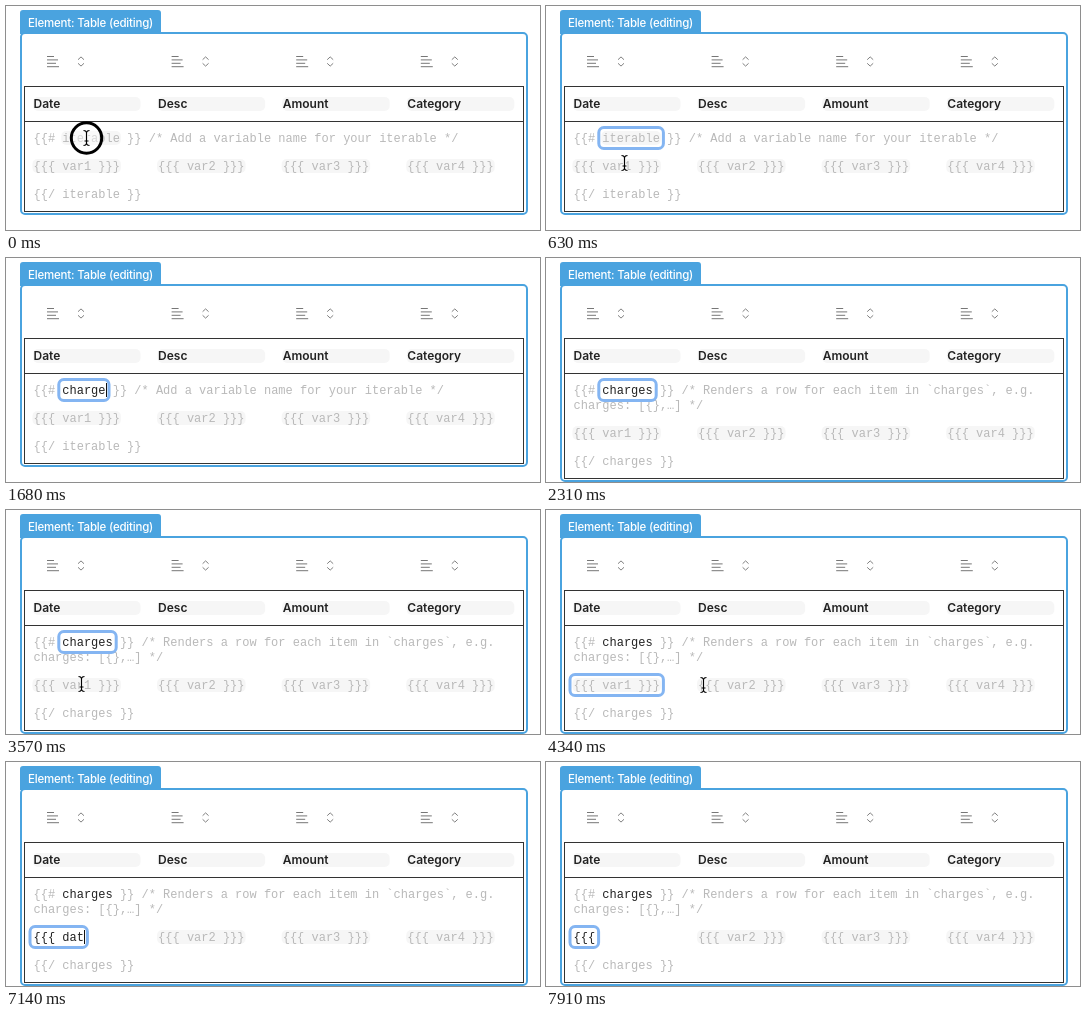
These frames come from a looping animation (534x224 px, 8 s). An HTML page with a canvas:

```html
<!DOCTYPE html>
<html lang="en">
<head>
<meta charset="utf-8">
<title>Table editing</title>
<style>
  html, body { margin: 0; width: 100%; height: 100%; overflow: hidden; background: #fff; }
  canvas { display: block; width: 534px; height: 224px; }
</style>
</head>
<body>
<canvas id="stage"></canvas>
<script>
const W = 534, H = 224, LOOP = 8000, STEP = 70;
const MONO = '12px "Liberation Mono", monospace';
const SANS = 'Inter, sans-serif';
const CHAR = 7.2, LEFT = 27.5, COL = 124.6;
const BLUE = '#4aa3df', RING = '#84b5f2', PILL = '#f6f6f6';
const FAINT = '#b9b9b9', DARK = '#222';
const HEADS = ['Date', 'Desc', 'Amount', 'Category'];

const FOCUS_NAME = 70, FOCUS_VAR = 3780, RENDER = 2310;
// [time, field content]
const NAME_KEYS = [
  [1050, 'c'], [1190, 'ch'], [1260, 'cha'], [1400, 'char'],
  [1540, 'charg'], [1680, 'charge'], [1750, 'charges']
];
const VAR_KEYS = [
  [4900, '{'], [5110, '{{'], [5670, '{{{'], [5950, '{{{ '],
  [6020, '{{{ d'], [6090, '{{{ da'], [6160, '{{{ dat'], [6230, '{{{ date'],
  [7140, '{{{ dat'], [7280, '{{{ da'], [7490, '{{{ d'], [7560, '{{{ '],
  [7840, '{{{']
];
// [start, end, x0, y0, x1, y1]
const MOVES = [
  [0, 140, 80, 132, 80, 132],
  [140, 490, 80, 132, 78, 157],
  [490, 1050, 78, 157, 78, 157],
  [2380, 3080, 78, 157, 76, 177],
  [3080, 3430, 76, 177, 76, 177],
  [3430, 3570, 76, 177, 75, 174],
  [3570, 3850, 75, 174, 75, 174],
  [3850, 4060, 75, 174, 157, 175],
  [4060, 4900, 157, 175, 157, 175]
];
const CLICKS = [[0, 140], [3640, 3850]];

const canvas = document.getElementById('stage');
const ctx = canvas.getContext('2d');
const dpr = window.devicePixelRatio || 1;
canvas.width = W * dpr;
canvas.height = H * dpr;

const ease = p => p * p * (3 - 2 * p);
const lastKey = (keys, t) => keys.filter(k => k[0] <= t).pop();

function text(str, x, y, color, font = MONO, spacing = '0px') {
  ctx.font = font;
  ctx.letterSpacing = spacing;
  ctx.fillStyle = color;
  ctx.fillText(str, x, y);
}

function roundBox(x, y, w, h, r) {
  ctx.beginPath();
  ctx.roundRect(x, y, w, h, r);
}

function pill(x, y, w, h = 14) {
  ctx.fillStyle = PILL;
  roundBox(x, y, w, h, 5);
  ctx.fill();
}

function lines(points, color, width) {
  ctx.strokeStyle = color;
  ctx.lineWidth = width;
  ctx.beginPath();
  for (const path of points) {
    path.forEach(([x, y], i) => i ? ctx.lineTo(x, y) : ctx.moveTo(x, y));
  }
  ctx.stroke();
}

function icons(x) {
  const rows = [7, 11, 9, 12];
  lines(rows.map((w, i) => [[x, 50.5 + i * 3.4], [x + w, 50.5 + i * 3.4]]), '#777', 1);
  const c = x + 34;
  lines([
    [[c - 3, 53.7], [c, 50.9], [c + 3, 53.7]],
    [[c - 3, 57.3], [c, 60.1], [c + 3, 57.3]]
  ], '#808080', 1);
}

function frame(shift) {
  ctx.strokeStyle = BLUE;
  ctx.lineWidth = 2;
  roundBox(15, 27, 506, 181 + shift, 4);
  ctx.stroke();
  ctx.fillStyle = BLUE;
  roundBox(14, 4, 141, 24, [3, 3, 0, 0]);
  ctx.fill();
  text('Element: Table (editing)', 22, 21, '#fff', '500 11.5px ' + SANS, '-0.2px');

  HEADS.forEach((head, i) => {
    icons(41 + i * COL);
    pill(27 + i * COL, 91, 107.5);
    text(head, LEFT + i * COL, 102, DARK, '600 12px ' + SANS);
  });
  ctx.strokeStyle = '#333';
  ctx.lineWidth = 1;
  ctx.strokeRect(18.5, 80.5, 499, 125 + shift);
  lines([[[18, 115.5], [518, 115.5]]], '#333', 1);
}

// Editable slot: placeholder until a value is typed.
function field(x, base, value, hint, focused, caretOn) {
  const w = (value || hint).length * CHAR;
  if (focused) {
    ctx.fillStyle = '#fff';
    ctx.strokeStyle = RING;
    ctx.lineWidth = 3;
    roundBox(x - 3.5, base - 14.5, w + 7, 21, 5);
    ctx.fill();
    ctx.stroke();
  }
  if (!value) pill(x - 1, base - 11, w + 2);
  text(value || hint, x, base, value ? DARK : FAINT);
  if (focused && caretOn) {
    ctx.fillStyle = '#111';
    ctx.fillRect(Math.round(x + value.length * CHAR), base - 11, 1, 14);
  }
}

function blink(age) {
  return age < 560 || (age - 560) % 980 >= 490;
}

function pointer(t) {
  const move = MOVES.find(m => t >= m[0] && t < m[1]);
  if (!move) return;
  const [start, end, x0, y0, x1, y1] = move;
  const p = ease((t - start) / (end - start));
  const x = Math.round(x0 + (x1 - x0) * p) + 0.5;
  const y = Math.round(y0 + (y1 - y0) * p);

  if (CLICKS.some(([a, b]) => t >= a && t < b)) {
    ctx.beginPath();
    ctx.arc(x, y, 15.2, 0, Math.PI * 2);
    ctx.fillStyle = 'rgba(255,255,255,.45)';
    ctx.fill();
    ctx.strokeStyle = '#000';
    ctx.lineWidth = 3;
    ctx.stroke();
  }
  const beam = [
    [[x - 3, y - 7.5], [x - 1, y - 7], [x, y - 5.5], [x, y + 5.5], [x - 1, y + 7], [x - 3, y + 7.5]],
    [[x + 3, y - 7.5], [x + 1, y - 7], [x, y - 5.5]],
    [[x + 3, y + 7.5], [x + 1, y + 7], [x, y + 5.5]],
    [[x - 2, y + 3], [x + 2, y + 3]]
  ];
  lines(beam, '#fff', 3);
  lines(beam, '#000', 1.2);
}

function draw(t) {
  const rendered = t >= RENDER;
  const shift = rendered ? 15 : 0;
  const nameKey = lastKey(NAME_KEYS, t), varKey = lastKey(VAR_KEYS, t);
  const name = nameKey ? nameKey[1] : '';
  const value = varKey ? varKey[1] : '';
  const onName = t >= FOCUS_NAME && t < FOCUS_VAR;
  const onVar = t >= FOCUS_VAR;
  const since = onVar ? (varKey ? varKey[0] : FOCUS_VAR) : (nameKey ? nameKey[0] : FOCUS_NAME);
  const caretOn = blink(t - since) && t < 7910;

  ctx.setTransform(dpr, 0, 0, dpr, 0, 0);
  ctx.fillStyle = '#fff';
  ctx.fillRect(0, 0, W, H);
  frame(shift);

  const nameX = LEFT + 4 * CHAR;
  const nameEnd = nameX + (name || 'iterable').length * CHAR;
  const note = rendered
    ? '/* Renders a row for each item in `charges`, e.g.'
    : '/* Add a variable name for your iterable */';
  text('{{#', LEFT, 136, FAINT);
  text('}} ' + note, nameEnd + CHAR, 136, FAINT);
  if (rendered) text('charges: [{},…] */', LEFT, 151, FAINT);
  field(nameX, 136, name, 'iterable', onName, caretOn);

  HEADS.forEach((_, i) => {
    const first = i === 0;
    field(LEFT + i * COL, 164 + shift, first ? value : '', `{{{ var${i + 1} }}}`, first && onVar, caretOn);
  });
  text(`{{/ ${rendered ? 'charges' : 'iterable'} }}`, LEFT, 192 + shift, FAINT);
  pointer(t);
}

const begin = performance.now();
function tick() {
  const t = (performance.now() - begin) % LOOP;
  draw(Math.floor(t / STEP) * STEP);
  requestAnimationFrame(tick);
}
tick();
</script>
</body>
</html>
```
